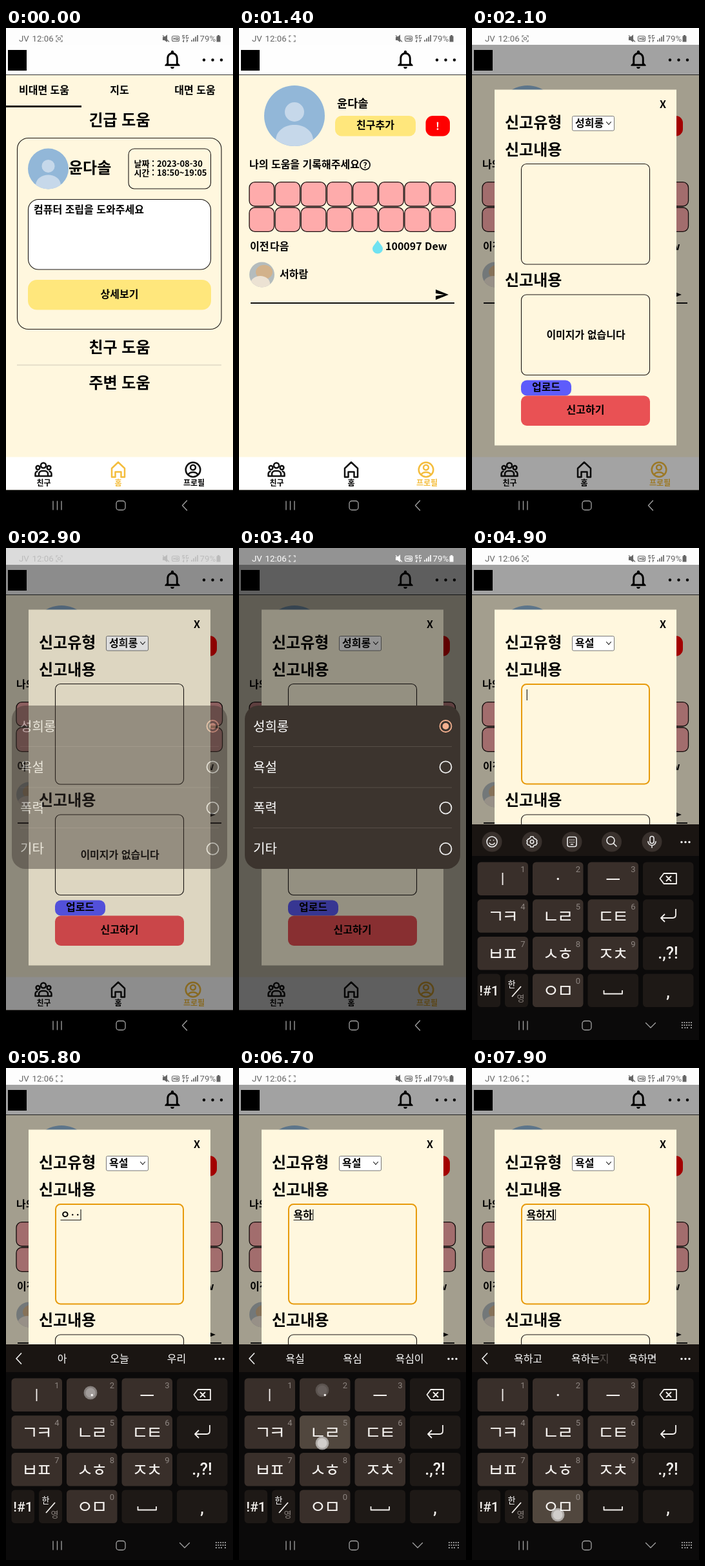
Animation, 352 px wide and 762 px high, one loop 8000 ms. Source, as an HTML page:

```html
<!DOCTYPE html>
<html lang="ko">
<head>
<meta charset="utf-8">
<title>도움 앱 신고 화면</title>
<style>
html, body { margin: 0; width: 100%; height: 100%; overflow: hidden; background: #000; }
svg { display: block; width: 100%; height: 100%; }
text { font: 700 16px "Noto Sans CJK KR", "Noto Sans KR", "Noto Sans CJK JP", sans-serif; }
.mid { text-anchor: middle; }
.h { font-size: 24px; }
.meta { font-size: 13px; }
.tiny { font-size: 12px; }
.line { fill: none; stroke: #111; stroke-linecap: round; stroke-linejoin: round; }
.box { fill: none; stroke: #1a1614; stroke-width: 1.1; }

.status { color: #666; animation: status 8s linear infinite; }
.status text { font: 400 13.3px Roboto, sans-serif; fill: currentColor; }
.option { font-size: 20px; font-weight: 400; fill: #fff; }
.key { font-size: 28px; font-weight: 500; letter-spacing: -3.5px; fill: #f4f1ee; }
.num { font: 400 13px Roboto, sans-serif; fill: #8d8580; }
.sign { font: 500 21px Roboto, sans-serif; fill: #f4f1ee; }
.hint { font-size: 16px; font-weight: 400; fill: #fff; }

.home { animation: home 8s linear infinite; }
.profile { animation: profile 8s linear infinite; }
.modal { animation: modal 8s linear infinite; }
.dim { animation: dim 8s linear infinite; }
.dialog { animation: dialog 8s linear infinite; }
.before { animation: before 8s linear infinite; }
.after { animation: after 8s linear infinite; }
.pickFocus { animation: pickFocus 8s linear infinite; }
.areaFocus, .navKeys { animation: typing 8s linear infinite; }
.areaPlain, .navPlain { animation: plain 8s linear infinite; }
.keyboard { animation: slide 8s infinite; }
.tools { animation: tools 8s linear infinite; }
.hints { animation: hints 8s linear infinite; }
.keys { animation: rise 8s linear infinite; }

@keyframes home { 0%, 8.49% { opacity: 1 } 8.5%, 100% { opacity: 0 } }
@keyframes profile { 0%, 8.49% { opacity: 0 } 8.5%, 100% { opacity: 1 } }
@keyframes modal { 0%, 23.49% { opacity: 0 } 23.5%, 100% { opacity: 1 } }
@keyframes dim { 0%, 34.5% { opacity: 0 } 40%, 51.25% { opacity: .42 } 55%, 100% { opacity: 0 } }
@keyframes dialog { 0%, 34.5% { opacity: 0 } 38.5%, 51% { opacity: 1 } 52.9%, 100% { opacity: 0 } }
@keyframes status {
  0%, 34.5% { color: #666 } 36.25% { color: #bcbcbc } 38.2%, 51.2% { color: #fff }
  52.5% { color: #8a8a8a } 53.7%, 100% { color: #666 }
}
@keyframes before { 0%, 50.99% { opacity: 1 } 51%, 100% { opacity: 0 } }
@keyframes after { 0%, 50.99% { opacity: 0 } 51%, 100% { opacity: 1 } }
@keyframes pickFocus { 0%, 50.99% { opacity: 0 } 51%, 58.59% { opacity: 1 } 58.6%, 100% { opacity: 0 } }
@keyframes typing { 0%, 58.59% { opacity: 0 } 58.6%, 100% { opacity: 1 } }
@keyframes plain { 0%, 58.59% { opacity: 1 } 58.6%, 100% { opacity: 0 } }
@keyframes slide {
  0%, 58.6% { transform: translateY(334px); animation-timing-function: cubic-bezier(.2, .6, .3, 1) }
  60.75%, 100% { transform: none }
}
@keyframes tools { 0%, 66.99% { opacity: 1 } 67%, 100% { opacity: 0 } }
@keyframes hints { 0%, 66.99% { opacity: 0 } 67%, 100% { opacity: 1 } }
@keyframes rise { 0%, 66.99% { transform: translateY(6px) } 67%, 100% { transform: none } }
</style>
</head>
<body>
<svg viewBox="0 0 352 762" preserveAspectRatio="none">
<defs>
  <g id="person">
    <circle r="47" fill="#92b7d8"/>
    <circle cy="-6" r="15" fill="#c6d8ea"/>
    <path d="M-29 37C-28 22-14 14 0 14S28 22 29 37A47 47 0 0 1-29 37Z" fill="#c6d8ea"/>
  </g>
  <g id="people" fill="none" stroke="currentColor" stroke-width="2.5" stroke-linejoin="round">
    <circle cy="-7.5" r="4"/><circle cx="-8.5" cy="-4" r="2.9"/><circle cx="8.5" cy="-4" r="2.9"/>
    <path d="M-7 9V6a5 5 0 0 1 5-5H2a5 5 0 0 1 5 5V9ZM-7 9H-12.5V5.500a4 4 0 0 1 4-4M7 9H12.500V5.500a4 4 0 0 0-4-4"/>
  </g>
  <path id="house" d="M-10-2L0-11.500 10-2V11.500H4.500V3.500H-4.500V11.500H-10Z" fill="none" stroke="currentColor" stroke-width="2.5" stroke-linejoin="round"/>
  <g id="me" fill="none" stroke="currentColor" stroke-width="2.5">
    <circle r="11.300"/><circle cy="-3.300" r="3.900"/><path d="M-7.500 8C-5 2.800 5 2.800 7.500 8"/>
  </g>
  <clipPath id="round"><circle cx="35.500" cy="382" r="19.500"/></clipPath>
</defs>

<rect width="352" height="762" fill="#fff7de"/>
<rect y="26" width="352" height="46" fill="#fefefe"/>
<rect x="3" y="34" width="29" height="32"/>
<path transform="translate(240.600 31.200) scale(1.450)" d="M12 22c1.100 0 2-.9 2-2h-4c0 1.100.9 2 2 2zm6-6v-5c0-3.070-1.630-5.640-4.500-6.320V4c0-.83-.67-1.500-1.500-1.500s-1.500.67-1.500 1.500v.68C7.640 5.360 6 7.920 6 11v5l-2 2v1h16v-1l-2-2zm-2 1H8v-6c0-2.480 1.510-4.500 4-4.500s4 2.020 4 4.500v6z"/>
<circle cx="307" cy="49.500" r="2.200"/><circle cx="320.500" cy="49.500" r="2.200"/><circle cx="334" cy="49.500" r="2.200"/>
<path d="M0 72.500H352" stroke="#333" stroke-width="1.200"/>
<rect y="664.500" width="352" height="51" fill="#fff"/>

<g class="home">
  <g class="mid">
    <text x="59" y="102">비대면 도움</text>
    <text x="176" y="102">지도</text>
    <text x="293" y="102">대면 도움</text>
    <text class="h" x="176" y="151">긴급 도움</text>
    <text class="h" x="176" y="503">친구 도움</text>
    <text class="h" x="176" y="558">주변 도움</text>
  </g>
  <rect y="120" width="117" height="3" fill="#231b18"/>
  <rect class="box" x="17.500" y="170.500" width="316.500" height="296" rx="17"/>
  <use href="#person" transform="translate(65.500 218) scale(.67)"/>
  <text class="h" x="97" y="225">윤다솔</text>
  <rect class="box" x="190" y="187" width="127.500" height="62" rx="9"/>
  <text class="meta" x="198.500" y="215">날짜 : 2023-08-30</text>
  <text class="meta" x="198.500" y="228.500">시간 : 18:50~19:05</text>
  <rect class="box" x="34.500" y="265.500" width="283" height="108.500" rx="16" style="fill:#fff"/>
  <text x="43" y="287">컴퓨터 조립을 도와주세요</text>
  <rect x="34" y="390" width="284" height="46.500" rx="14" fill="#ffe77c"/>
  <text class="mid" x="176" y="418">상세보기</text>
  <path d="M17 522H334" stroke="#cfc9b8"/>
  <use href="#house" x="174" y="684" color="#f4bd3d"/>
  <use href="#me" x="290" y="684" color="#111"/>
  <text class="mid tiny" x="174" y="708.500" fill="#f4bd3d">홈</text>
  <text class="mid tiny" x="291.500" y="708.500">프로필</text>
</g>

<g class="profile">
  <use href="#person" x="86" y="136"/>
  <text x="152" y="123" style="font-size:17.600px">윤다솔</text>
  <rect x="149" y="136" width="125" height="31.500" rx="10" fill="#ffe77c"/>
  <text class="mid" x="211.500" y="156">친구추가</text>
  <rect x="289.500" y="136" width="37.500" height="31.500" rx="11" fill="#f00"/>
  <text class="mid" x="308" y="158" fill="#fff">!</text>
  <text x="16" y="217">나의 도움을 기록해주세요</text>
  <circle class="line" cx="195.500" cy="212" r="7.600" stroke-width="1.700"/>
  <text class="mid tiny" x="195.500" y="216.500">?</text>
  <g id="grid" fill="#feabab" stroke="#1a0f0f" stroke-width="1.300"></g>
  <text x="17" y="344">이전</text><text x="48" y="344">다음</text>
  <path d="M215 328.500c3 5.500 8 9 8 13.500a8 7.500 0 0 1-16 0c0-4.500 5-8 8-13.500Z" fill="#6fe2f1"/>
  <text x="227" y="344">100097 Dew</text>
  <g clip-path="url(#round)">
    <rect x="15" y="362" width="41" height="41" fill="#b4bcbd"/>
    <ellipse cx="39" cy="378" rx="13" ry="11" fill="#d2b28b"/>
    <ellipse cx="33" cy="396" rx="15" ry="12" fill="#ece2d3"/>
  </g>
  <text x="63" y="387">서하람</text>
  <path d="M305 405L325 413 305 421V415L318 413 305 411Z"/>
  <path d="M18 426H334" stroke="#111" stroke-width="1.800"/>
  <use href="#house" x="174" y="684" color="#111"/>
  <use href="#me" x="290" y="684" color="#f4bd3d"/>
  <text class="mid tiny" x="174" y="708.500">홈</text>
  <text class="mid tiny" x="291.500" y="708.500" fill="#f4bd3d">프로필</text>
</g>
<use href="#people" x="58" y="685" color="#111"/>
<text class="mid tiny" x="58.500" y="708.500">친구</text>

<g class="modal">
  <rect y="26" width="352" height="689.500" opacity=".36"/>
  <rect x="35" y="95.500" width="282" height="551" fill="#fff7de"/>
  <text class="mid" x="296" y="124" style="font-size:16px">X</text>
  <text class="h" x="51" y="155">신고유형</text>
  <text class="h" x="51" y="197">신고내용</text>
  <text class="h" x="51" y="399">신고내용</text>
  <rect x="155.500" y="136.500" width="65" height="22.500" rx="2" fill="#fff" stroke="#777"/>
  <text class="before" x="160" y="153">성희롱</text>
  <text class="after" x="160" y="153">욕설</text>
  <path class="line" d="M208.500 145.500L212 149.500 215.500 145.500" stroke-width="1.100"/>
  <rect class="pickFocus" x="156" y="136.500" width="64" height="22" rx="2" fill="none" stroke="#e79a0b" stroke-width="2"/>
  <rect class="box areaPlain" x="76.500" y="210.500" width="199" height="155.500" rx="8"/>
  <rect class="areaFocus" x="77" y="211" width="198" height="154.500" rx="7.500" fill="none" stroke="#e79a0b" stroke-width="2"/>
  <text id="typed" x="84.500" y="233"></text>
  <path id="under" stroke="#222"/>
  <path id="caret" stroke="#222" stroke-width="1.200"/>
  <rect class="box" x="76.500" y="413" width="199" height="124.500" rx="8"/>
  <text class="mid" x="176.500" y="481">이미지가 없습니다</text>
  <rect x="76" y="545.500" width="78" height="24" rx="9" fill="#5e5cfb"/>
  <text class="mid" x="115" y="562">업로드</text>
  <rect x="76" y="569.500" width="200" height="46.500" rx="9" fill="#e95154"/>
  <text class="mid" x="176" y="597">신고하기</text>
</g>

<rect y="0" width="352" height="26" fill="#fdfdfd"/>
<rect y="715.500" width="352" height="47"/>
<rect class="dim" width="352" height="762"/>

<g class="status">
  <text x="20" y="21">JV</text><text x="40.500" y="21">12:06</text><text x="300.500" y="21">79%</text>
  <g fill="none" stroke="currentColor" stroke-width="1.100">
    <path d="M78 14.500V12H80.500M84.500 12H87V14.500M87 18.500V21H84.500M80.500 21H78V18.500"/>
    <rect id="shot" x="80.500" y="14.800" width="4" height="3.500" rx="1.200"/>
    <path d="M243.500 14.500H246L249.500 11.500V21L246 18.500H243.500Z" fill="currentColor"/>
    <path d="M243 11.500L253 21.500"/>
    <rect x="257.500" y="12.500" width="11" height="8" rx="2"/>
    <path d="M260 14.500V18.500M262.500 14.500V18.500M260 16.500H262.500M264.500 14.500V18.500C267.500 18.500 267.500 14.500 264.500 14.500"/>
    <path d="M277 11.500H274V14H276.500V16H273.500M282.500 11.500H279.500V16H282.500V14M275.500 18V22M274 20L275.500 22M280.500 22V18M282 20L280.500 18"/>
    <path d="M288 21V18.500M291 21V16M294 21V13.500M297 21V11" stroke-width="1.700"/>
  </g>
  <path d="M328 11H331V12.500H332.500V21.500H326.500V12.500H328Z" fill="currentColor"/>
</g>

<g class="dialog">
  <rect x="9" y="244" width="334" height="253" rx="21" fill="#3c342e"/>
  <path d="M22 307.500H330M22 371H330M22 433.500H330" stroke="#574e47"/>
  <g id="options"></g>
</g>

<g class="keyboard">
  <rect y="428" width="352" height="334" fill="#0b0a0a"/>
  <rect y="428" width="352" height="43" fill="#1a1512"/>
  <g fill="#eee"><circle cx="325" cy="450.500" r="1.700"/><circle cx="331" cy="450.500" r="1.700"/><circle cx="337" cy="450.500" r="1.700"/></g>
  <g class="tools">
    <rect y="428" width="352" height="49" fill="#1a1512"/>
    <g fill="#39312d"><circle cx="31" cy="455" r="15.500"/><circle cx="93" cy="455" r="15.500"/><circle cx="155" cy="455" r="15.500"/><circle cx="216.500" cy="455" r="15.500"/><circle cx="279" cy="455" r="15.500"/></g>
    <g class="line" style="stroke:#eee" stroke-width="1.600">
      <circle cx="31" cy="455" r="8"/><path d="M27 457a4.400 4.400 0 0 0 8 0M28.500 452.500v.2M33.500 452.500v.2"/>
      <path d="M91 447h4l1 2.500 3 1.500 2 2.500-1 1.500 1 2-2 3-3 .5-1 2.500h-4l-1-2.500-3-.5-2-3 1-2-1-1.500 2-2.500 3-1.500Z"/><circle cx="93" cy="455" r="2.700"/>
      <rect x="148" y="447.500" width="14" height="15" rx="3"/><path d="M152 452v.2M155 452v.2M158 452v.2M152 455.500v.2M155 455.500v.2M158 455.500v.2M153.500 459h3"/>
      <circle cx="215" cy="453" r="6"/><path d="M219.500 457.500L224 462"/>
      <rect x="276" y="446.500" width="6" height="11" rx="3"/><path d="M273 454.500a6 6 0 0 0 12 0M279 460.500V464"/>
    </g>
    <g fill="#eee"><circle cx="325" cy="455.500" r="1.700"/><circle cx="331" cy="455.500" r="1.700"/><circle cx="337" cy="455.500" r="1.700"/></g>
  </g>
  <g class="hints">
    <path class="line" d="M23.500 442L16 450 23.500 458" style="stroke:#eee" stroke-width="1.700"/>
    <g id="hints" class="mid"></g>
  </g>
  <g class="keys" id="keys"></g>
</g>

<g class="line" style="stroke:#a3a3a3" stroke-width="1.300">
  <path d="M73 733V746M79.500 733V746M86 733V746"/>
  <rect x="171" y="732.500" width="14" height="14" rx="4"/>
  <path class="navPlain" d="M280.500 732L273.500 739.500 280.500 747"/>
  <g class="navKeys">
    <path d="M269.500 735.500L277 743 284.500 735.500"/>
    <path d="M325 735h16M325 739h16M325 743h2M329.500 743h7M339 743h2" stroke-dasharray="1.800 1.750" stroke-width="2" stroke-linecap="butt"/>
  </g>
</g>
<g id="taps"></g>
</svg>

<script>
const LOOP = 8000;
const $ = id => document.getElementById(id);

function add(parent, tag, attrs, text) {
  const el = document.createElementNS("http://www.w3.org/2000/svg", tag);
  for (const k in attrs) el.setAttribute(k, attrs[k]);
  if (text) el.textContent = text;
  parent.append(el);
  return el;
}

for (let i = 0; i < 16; i++)
  add($("grid"), "rect", { x: 16 + (i % 8) * 40.15, y: i < 8 ? 238.7 : 278, width: 38.5, height: 37.3, rx: 8.5 });

["성희롱", "욕설", "폭력", "기타"].forEach((name, i) => {
  const y = 276 + i * 63.3, on = i === 0;
  add($("options"), "text", { class: "option", x: 22, y: y + 7.5 }, name);
  add($("options"), "circle", { cx: 320.5, cy: y, r: 9, fill: "none", stroke: on ? "#f3b08f" : "#eee", "stroke-width": 1.8 });
  if (on) add($("options"), "circle", { cx: 320.5, cy: y, r: 5, fill: "#f3b08f" });
});

// Keypad
const colX = [8.5, 94, 179.5, 265], rowY = [480.5, 538.3, 596, 653.5];
const keys = {};
function addKey(name, x, y, w, soft) {
  const fill = soft ? "#1e1916" : "#392f2a";
  const el = add($("keys"), "rect", { x, y, width: w, height: 51.5, rx: 5.5, fill });
  keys[name] = { el, fill, lit: soft ? "#342c27" : "#51473e" };
}
function keyText(x, y, str, cls = "key") {
  return add($("keys"), "text", { class: cls + " mid", x, y }, str);
}
function keyIcon(d) {
  add($("keys"), "path", { d, fill: "none", stroke: "#f4f1ee", "stroke-width": 1.8, "stroke-linejoin": "round" });
}
["ㅣ", "·", "ㅡ", "ㄱㅋ", "ㄴㄹ", "ㄷㅌ", "ㅂㅍ", "ㅅㅎ", "ㅈㅊ", "ㅇㅁ"].forEach((name, i) => {
  const x = colX[i < 9 ? i % 3 : 1], y = rowY[Math.floor(i / 3)];
  addKey(name, x, y, 78.5);
  if (i > 2) keyText(x + 37.7, y + 36.5, name);
  keyText(x + 70.5, y + 15.5, String((i + 1) % 10), "num");
});
["del", "enter", "marks", "comma"].forEach((name, i) => addKey(name, colX[3], rowY[i], 78.5, true));
addKey("space", colX[2], rowY[3], 78.5, true);
addKey("sym", 8.5, rowY[3], 35.5, true);
addKey("lang", 51, rowY[3], 36, true);
keyIcon("M47.500 497V516M208.500 507H229");
keyIcon("M297.500 498H317V514H297.500L291.500 506ZM301 502L309 510M309 502L301 510");
keyIcon("M316 553V562Q316 567 311 567H293.500M299 561L293 567 299 573");
keyIcon("M204.500 679V684.500H233V679");
keyIcon("M62 689L76 673");
add($("keys"), "circle", { cx: 133.3, cy: 506.5, r: 1.7, fill: "#f4f1ee" });
keyText(304, 630, ".,?!", "sign").style.fontSize = "25px";
keyText(304, 690, ",", "sign").style.fontSize = "25px";
keyText(26.5, 686.5, "!#1", "sign");
keyText(61.5, 674, "한", "hint").style.fontSize = "13px";
const eng = keyText(75.5, 696, "영", "hint");
eng.style.cssText = "font-size:13px;fill:#8d8580";

// press time, key, touch point, text after the press
const strokes = [
  [5270, "ㅇㅁ", 133, 686, "ㅇ"],
  [5520, "·", 131, 502, "ㅇㆍ"],
  [5690, "·", 131, 503, "ㅇ‥"],
  [5860, "ㅡ", 214, 506, "요"],
  [6060, "ㄱㅋ", 50, 570, "욕"],
  [6250, "ㅅㅎ", 130, 624, "욕ㅅ"],
  [6350, "ㅅㅎ", 130, 624, "욕ㅎ"],
  [6460, "ㅣ", 52, 504, "욕히"],
  [6560, "·", 129, 499, "욕하"],
  [6670, "ㄴㄹ", 129, 581, "욕한"],
  [7080, "del", 302, 508, "욕하"],
  [7320, "ㅈㅊ", 214, 625, "욕핮"],
  [7520, "ㅣ", 50, 508, "욕하지"],
  [7860, "ㅇㅁ", 133, 692, "욕하지"]
];
const hints = [
  [0, "아", "오늘", "우리"],
  [5960, "요", "요즘", "요리"],
  [6160, "욕", "욕심", "욕실"],
  [6350, "욕실", "욕심", "욕심이"],
  [6780, "욕하고", "욕하는", "욕하면"],
  [7620, "욕하지", "욕하는", "욕하지만"],
  [7840, "욕하고", "욕하는", "욕하면", "지"]
];
const hintEls = [87, 176, 264.5, 205].map((x, i) =>
  add($("hints"), "text", { class: "hint", x, y: 456, style: i === 3 ? "fill:#5a5451" : "" }));

// start, hold, fade, x, y
const taps = [
  [150, 250, 120, 65, 218],
  [1560, 190, 130, 308, 152],
  [2370, 280, 300, 187, 149],
  [3880, 170, 300, 185, 340],
  [4570, 100, 120, 175, 285],
  ...strokes.map(s => [s[0], 90, 75, s[2], s[3]])
].map(([at, hold, fade, x, y]) => {
  const el = add($("taps"), "g", { transform: `translate(${x} ${y})` });
  add(el, "circle", { r: 10.5, fill: "#fff", "fill-opacity": .55, stroke: "#000", "stroke-opacity": .12 });
  add(el, "circle", { r: 7.5, fill: "#fff", "fill-opacity": .4 });
  return { el, at, hold, fade };
});

function draw(t) {
  const blink = (t - 1380 + 2020) % 1010;
  $("shot").style.opacity = blink < 480 ? 0 : 1;

  for (const { el, at, hold, fade } of taps) {
    const left = 1 - (t - at - hold) / fade;
    el.style.opacity = t < at ? 0 : Math.max(0, Math.min(1, left));
  }

  let str = "";
  for (const k in keys) keys[k].el.setAttribute("fill", keys[k].fill);
  for (const [at, name, , , after] of strokes) {
    if (t >= at + 90) str = after;
    if (t >= at && t < at + 110) keys[name].el.setAttribute("fill", keys[name].lit);
  }
  $("typed").textContent = str;
  const end = 85 + (str ? $("typed").getComputedTextLength() : 0);
  $("under").setAttribute("d", str ? `M84.500 235.500H${end}` : "");
  $("caret").setAttribute("d", `M${end + .3} 219V236`);
  $("caret").style.opacity = str || (t > 4690 && t < 5190) ? 1 : 0;

  const row = hints.filter(h => t >= h[0]).pop();
  hintEls.forEach((el, i) => el.textContent = row[i + 1] || "");
}

function tick() {
  draw(performance.now() % LOOP);
  requestAnimationFrame(tick);
}
tick();
</script>
</body>
</html>
```
